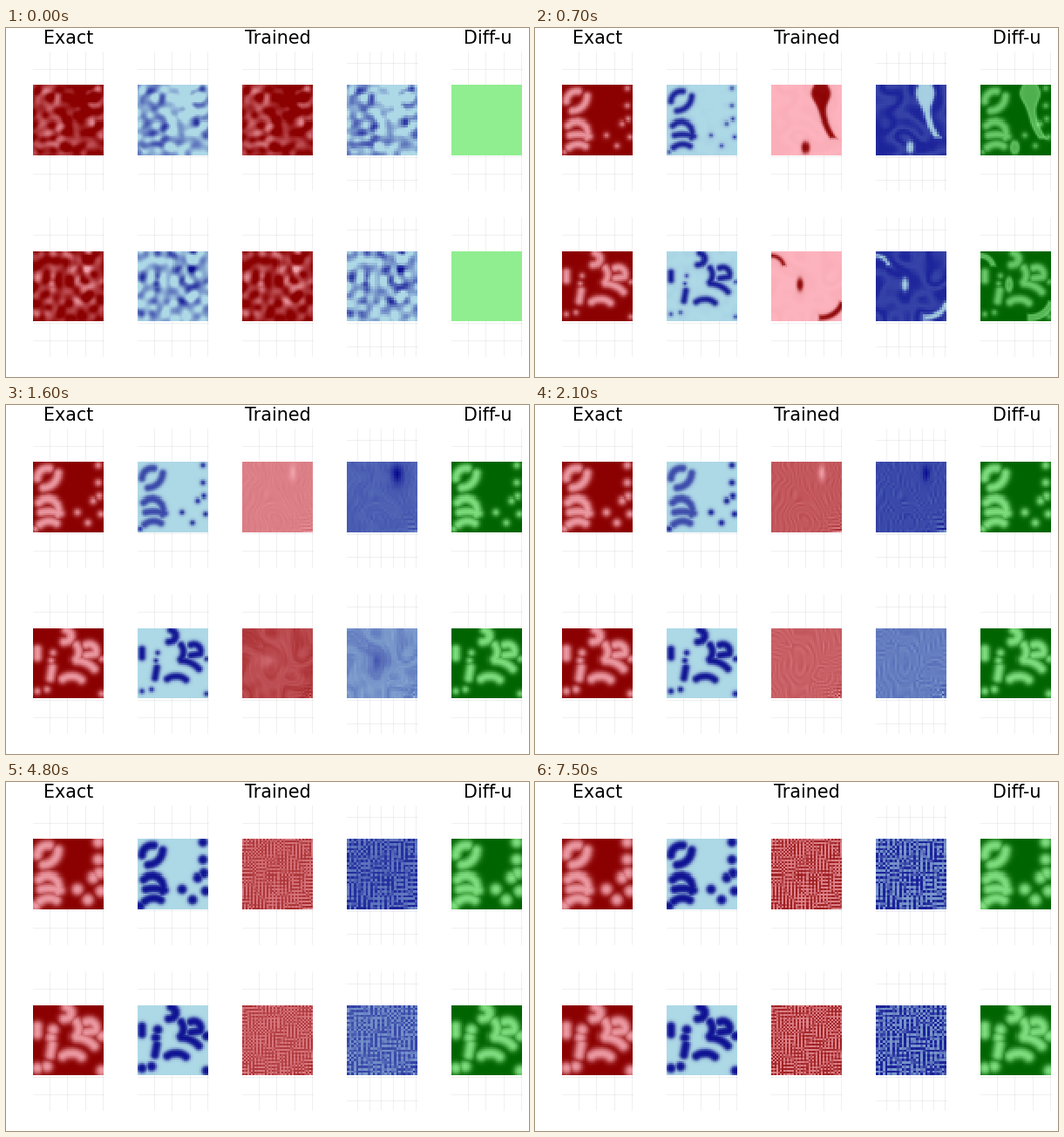
A matplotlib script for the animation above (7.6 s loop, 600 by 400 pixels).

```python
import numpy as np
import matplotlib.pyplot as plt
from matplotlib.animation import FuncAnimation
from matplotlib.colors import LinearSegmentedColormap

W, H, STEP, FRAMES = 600, 400, 100, 76
SIZE = 80
N_U, N_V = 40, 30


def arc(x, y, length, heading, turn, steps=6):
    """Points along a worm that leaves (x, y) and bends evenly; degrees."""
    angle = np.radians(heading + turn * np.linspace(0, 1, steps))
    xs = x + np.cumsum(np.cos(angle)) * length / steps
    ys = y + np.cumsum(np.sin(angle)) * length / steps
    return [(x, y), *zip(xs, ys)]


WORMS = [
    [arc(5, 19, 20, -80, 80), arc(12, 30, 26, -10, -70), arc(7, 46, 36, -35, 135),
     arc(31, 58, 22, 195, -25), arc(8, 71, 20, -35, 60)],
    [arc(38, 2, 20, 30, 140), arc(5, 24, 9, 90, 0), arc(22, 45, 12, 100, 0),
     arc(49, 19, 18, 60, 65), arc(49, 37, 23, 5, 40), arc(60, 19, 18, -15, 110),
     arc(60, 31, 11, -10, 0), arc(34, 58, 22, -30, 65)],
]
SPOTS = [
    [(50, 57), (62, 69), (68, 44), (75, 39), (74, 24), (74, 4), (77, 59), (3, 76)],
    [(23, 28), (16, 70), (5, 72), (78, 35), (78, 75), (21, 37)],
]


def sigmoid(a):
    return 1 / (1 + np.exp(-np.clip(a, -40, 40)))


def worm_distance(paths, x, y):
    best = np.full(x.shape, 1e3)
    for path in paths:
        for (ax, ay), (bx, by) in zip(path, path[1:]):
            dx, dy = bx - ax, by - ay
            h = np.clip(((x - ax) * dx + (y - ay) * dy) / (dx * dx + dy * dy), 0, 1)
            best = np.minimum(best, np.hypot(x - ax - h * dx, y - ay - h * dy))
    return best


def patch_distance(row, x, y):
    """Signed distance to the dark patches of the trained field."""
    if row == 0:
        middle = 56 + 14 * (y / 60) ** 3
        width = 3.5 + 7.5 * np.exp(-((y - 10) / 13) ** 2)
        tail = np.maximum(np.abs(x - middle) - width, y - 60)
        return np.minimum(tail, np.hypot(x - 39, 0.6 * (y - 71)) - 4)
    blob = np.hypot(x - 33, 0.5 * (y - 38)) - 3.5
    corner = np.maximum(np.abs(np.hypot(x - 56, y - 50) - 26) - 3,
                        np.maximum(54 - x, 58 - y))
    hook = np.maximum(np.abs(np.hypot(x, y - 20) - 15) - 2, y - 16)
    return np.minimum(blob, np.minimum(corner, hook))


def waves(x, y, seed, length):
    """Smooth isotropic random field with one dominant wavelength."""
    rng = np.random.default_rng(seed)
    count = 80
    total = np.zeros(x.shape)
    for angle in np.pi * np.arange(count) / count:
        k = 2 * np.pi / length * rng.normal(1, 0.2)
        phase = rng.uniform(0, 2 * np.pi)
        total += np.cos(k * (x * np.cos(angle) + y * np.sin(angle)) + phase)
    return total * np.sqrt(2 / count)


def maze(x, y, seed):
    """Patches of one-cell stripes and checks that blend into each other."""
    col, row = np.meshgrid(*(np.arange(len(x)),) * 2)
    upright, level, check = (waves(x, y, seed + i, 30) for i in range(3))
    mix = upright * (-1.0) ** col + level * (-1.0) ** row + 0.8 * check * (-1.0) ** (col + row)
    return np.tanh(mix)


class Field:
    def __init__(self, row, n):
        c = (np.arange(n) + 0.5) * SIZE / n
        x, y = self.x, self.y = np.meshgrid(c, c)
        self.row, self.is_u = row, n == N_U
        self.worm = worm_distance(WORMS[row], x, y)
        self.spot = np.min([np.hypot(x - a, y - b) for a, b in SPOTS[row]], axis=0)
        self.patch = patch_distance(row, x, y)
        self.noise = waves(x, y, 5 + row, 16)
        if row == 0:
            self.noise -= 2 * np.exp(-((x - 56) / 15) ** 2 - ((y - 14) / 22) ** 2)
        self.soft = waves(x, y, 20 + row, 30)
        self.maze = maze(x, y, 40 + 10 * row)
        self.late = self.late_stages()

    def exact(self, t, is_u):
        """Amount of the reaction product, 0 to 1."""
        grow = 1 - np.exp(-t / 2200)
        s = min(t / 4500, 1)
        worm = self.worm - 3.7 - 2.1 * grow
        spot = self.spot - 2 - 4.2 * s * s * (3 - 2 * s)
        if is_u:
            body = sigmoid(-np.minimum(worm, spot) / (1.3 + 0.6 * grow))
        else:
            dip = 0.3 * np.exp(-((t - 1900) / 800) ** 2) * (self.row == 0)
            body = np.maximum((1 - dip) * sigmoid(-(worm + 0.9) / 1.1),
                              sigmoid(-(spot + 0.9) / 1.1))
        seeds = sigmoid(-(np.minimum(self.worm, self.spot) - 3) / 1.6)
        start = np.clip(0.14 + 0.45 * seeds + 0.2 * self.noise, 0, 1)
        mess = np.exp(-t / 220)
        return mess * start + (1 - mess) * body

    def u(self, t):
        return 1 - 0.88 * self.exact(t, True)

    def v(self, t):
        return 0.93 * self.exact(t, False)

    def dark(self, t):
        return sigmoid(-(self.patch + (t - 700) / 400 * 7) / 0.8)

    def late_stages(self):
        x, y, first_row = self.x, self.y, self.row == 0
        ripple = np.cos(1.15 * self.patch + 1.6 * self.soft) * (0.6 + 0.3 * self.noise)
        edge = np.exp(-np.minimum(np.minimum(x, y), SIZE - np.maximum(x, y)) / 3)
        corner = np.exp(-np.hypot(x - SIZE, y - SIZE) / 8)
        streak = np.exp(-((x - 57) / 4) ** 2 - ((y - 13) / 9) ** 2) * first_row
        rough = self.maze * (0.06 + 0.12 * edge + 0.35 * corner)
        detail = 0.06 * ripple + 0.5 * corner * self.maze
        if self.is_u:
            level = 0.52 if first_row else 0.47
            return [level + detail - 0.38 * streak, level + rough, 0.55 + 0.28 * self.maze]
        level = 0.66 if first_row else 0.42
        return [level + detail + 0.28 * streak, level + rough, 0.57 + 0.28 * self.maze]

    def trained(self, t):
        dark, first_row = self.dark(t), self.row == 0
        swirl = np.cos(0.22 * self.patch + 1.2 * self.soft)
        glow = np.exp(-np.hypot(self.x - 33, self.y - 37) / 10)
        halo = np.exp(-((self.x - 57) / 8) ** 2 - ((self.y - 14) / 13) ** 2)
        if self.is_u:
            start = self.u(t)
            flat = 0.03 + 0.015 * swirl + 0.93 * dark
            faded = flat + 0.05 if first_row else 0.8 + 0.12 * swirl - 0.45 * glow
        else:
            start = self.v(t)
            flat = (0.72 + 0.07 * swirl) * (1 - dark) + 0.04
            faded = ((0.45 + 0.04 * swirl + 0.5 * halo) * (1 - dark) if first_row
                     else 0.24 + 0.12 * swirl + 0.5 * glow)
        stages = [start, flat, flat, faded, *self.late]
        k = np.interp(t, [0, 350, 800, 1100, 2100, 3600, 6000], range(7))
        i = min(int(k), 5)
        return stages[i] + (k - i) * (stages[i + 1] - stages[i])

    def diff(self, t):
        if t == 0:
            return np.zeros_like(self.x)
        dark = self.dark(t)
        rim = 4 * dark * (1 - dark)
        value = 1 - (1 - self.u(t)) * min(1.05, 0.2 + t / 1000)
        return value - min(1, t / 350) * (0.55 * dark + 0.3 * rim)


def ramp(low, high):
    return LinearSegmentedColormap.from_list(low + high, [low, high])


REDS = ramp("lightpink", "darkred")
BLUES = ramp("lightblue", "darkblue")
GREENS = ramp("lightgreen", "darkgreen")

fig = plt.figure(figsize=(W / 100, H / 100), dpi=100, facecolor="white")
ax = fig.add_axes([0, 0, 1, 1])
ax.axis("off")


def draw_grid(left, top, bottom, cells, spacing):
    middle, scale = (top + bottom) / 2, 80.4 / cells
    style = dict(color="black", alpha=0.075, lw=0.55, zorder=1)
    for tick in range(spacing, cells + 1, spacing):
        x = left + 0.3 + (tick - 0.5) * scale
        ax.plot([x, x], [middle - 79, middle + 80], **style)
    for tick in (-10, 0, cells + 10):
        y = middle + 0.5 + (cells / 2 + 0.5 - tick) * scale
        ax.plot([left, left + 81], [y, y], **style)


panels = []
for row, (top, bottom) in enumerate([(65, 146), (256, 336)]):
    fu, fv = Field(row, N_U), Field(row, N_V)
    columns = [(fu.u, REDS), (fu.v, BLUES), (fu.trained, REDS),
               (fv.trained, BLUES), (fu.diff, GREENS)]
    for col, (field, cmap) in enumerate(columns):
        left = 31 + 120 * col
        draw_grid(left, top, bottom, *((N_V, 5) if col == 3 else (N_U, 10)))
        image = ax.imshow(field(0), cmap=cmap, vmin=0, vmax=1, aspect="auto",
                          extent=(left, left + 81, bottom, top),
                          interpolation="nearest", zorder=2)
        panels.append((image, field))

for col, label in [(0, "Exact"), (2, "Trained"), (4, "Diff-u")]:
    ax.text(71.3 + 120.3 * col, 18, label, ha="center", va="baseline",
            fontsize=14.9, family="DejaVu Sans")

ax.set_xlim(0, W)
ax.set_ylim(H, 0)


def draw(frame):
    for image, field in panels:
        image.set_data(field(frame * STEP))
    return [image for image, _ in panels]


anim = FuncAnimation(fig, draw, frames=FRAMES, interval=STEP, repeat=True, repeat_delay=0)
plt.show()
```
